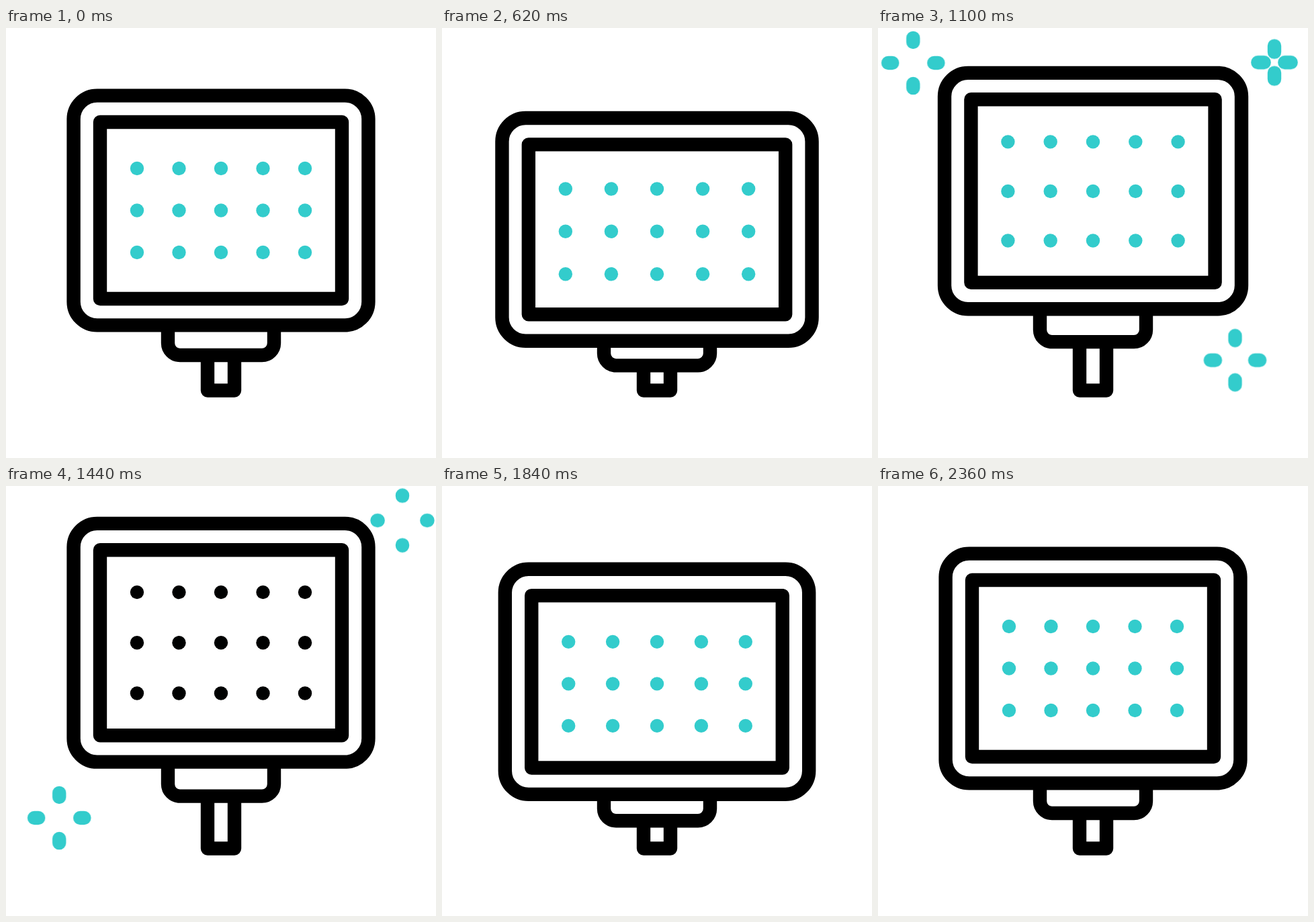
Recreate the animation shown at these times as an HTML page without scripts. Size 640 by 640 pixels, loop 2.56 s.

```html
<!DOCTYPE html>
<html lang="en">
<head>
<meta charset="utf-8">
<title>Bouncing light panel</title>
<style>
/* w: half width, t/b: panel top and bottom, n: neck bottom, c: middle dot row, g: row gap */
@property --w { syntax: "<length>"; inherits: true; initial-value: 219.4px; }
@property --t { syntax: "<length>"; inherits: true; initial-value: 100.6px; }
@property --b { syntax: "<length>"; inherits: true; initial-value: 442.4px; }
@property --n { syntax: "<length>"; inherits: true; initial-value: 487px; }
@property --c { syntax: "<length>"; inherits: true; initial-value: 271.5px; }
@property --g { syntax: "<length>"; inherits: true; initial-value: 62.5px; }
/* trimmed span of each spark arm */
@property --from { syntax: "<length>"; inherits: true; initial-value: 0px; }
@property --to { syntax: "<length>"; inherits: true; initial-value: 0px; }

:root {
  --teal: #33cccc;
  --loop: 2.56s;
  --smooth: cubic-bezier(.333, 0, .667, 1);
}
html, body { margin: 0; width: 100%; height: 100%; overflow: hidden; background: #fff; }
svg { display: block; width: 100%; height: 100%; }

.lamp { animation: bounce var(--loop) infinite; }
rect { fill: #fff; stroke: #000; stroke-width: 20.4px; stroke-linejoin: round; }
.stem { x: 300px; y: 400px; width: 40px; height: 139.5px; }
.neck { x: 241px; y: calc(var(--n) - 120px); width: 158px; height: 120px; rx: 18px; }
.case {
  x: calc(320px - var(--w)); y: var(--t);
  width: calc(2 * var(--w)); height: calc(var(--b) - var(--t));
  rx: 35px;
}
.screen {
  x: calc(359.4px - var(--w)); y: calc(var(--t) + 39.4px);
  width: calc(2 * var(--w) - 78.8px); height: calc(var(--b) - var(--t) - 78.8px);
}

circle {
  r: 10.2px;
  fill: var(--teal);
  cx: calc(320px + (var(--w) - 94.4px) * var(--i) / 2);
  cy: calc(var(--c) + var(--g) * var(--j));
  animation: blink-mid var(--loop) infinite;
}
circle:nth-child(1) { --i: -2; }
circle:nth-child(2) { --i: -1; }
circle:nth-child(3) { --i: 0; }
circle:nth-child(4) { --i: 1; }
circle:nth-child(5) { --i: 2; }
circle:first-child, circle:last-child { animation-name: blink-side; }

.spark {
  d: path("M0 -7.5V-37.5M0 7.5V37.5M-7.5 0H-37.5M7.5 0H37.5");
  fill: none;
  stroke: var(--teal);
  stroke-width: 20.4px;
  stroke-linecap: round;
  stroke-dasharray: calc(var(--to) - var(--from)) 99px;
  stroke-dashoffset: calc(-1 * var(--from));
  opacity: 0;
  animation: grow var(--loop) var(--at) infinite, trail var(--loop) var(--at) infinite,
    show var(--loop) var(--at) step-end infinite;
}

@keyframes bounce {
  0%, 7.8125%, 92.1875%, 100% {
    --w: 219.4px; --t: 100.6px; --b: 442.4px; --n: 487px; --c: 271.5px; --g: 62.5px;
    animation-timing-function: var(--smooth);
  }
  20.117% {
    --w: 231.4px; --t: 140px; --b: 470px; --n: 505.5px; --c: 308.2px; --g: 62.4px;
    animation-timing-function: cubic-bezier(.4, 0, .67, .59);
  }
  32.031% {
    --w: 226px; --t: 101px; --b: 442px; --n: 485px; --c: 273.2px; --g: 68.6px;
    animation-timing-function: cubic-bezier(.33, .43, .67, .77);
  }
  42.969% {
    --w: 221px; --t: 67px; --b: 418.3px; --n: 467.2px; --c: 243px; --g: 73.5px;
    animation-timing-function: cubic-bezier(.33, .66, .67, 1);
  }
  53.125%, 56.25% {
    --w: 219.4px; --t: 55.8px; --b: 410.6px; --n: 461.6px; --c: 233.2px; --g: 75.2px;
    animation-timing-function: var(--smooth);
  }
  68.75% {
    --w: 228px; --t: 129px; --b: 462.4px; --n: 500.5px; --c: 298.5px; --g: 62.5px;
    animation-timing-function: cubic-bezier(.33, 0, .67, .33);
  }
  71.875% {
    --w: 226.2px; --t: 123.8px; --b: 459px; --n: 498.3px; --c: 294.5px; --g: 62.5px;
    animation-timing-function: cubic-bezier(.33, .25, .67, 1);
  }
  81.25% {
    --w: 219.4px; --t: 84.6px; --b: 431px; --n: 478px; --c: 258px; --g: 66px;
    animation-timing-function: var(--smooth);
  }
}
@keyframes blink-mid {
  0%, 26.56%, 39.06%, 47.07%, 60.94%, 100% { fill: var(--teal); }
  31.25%, 34.37%, 51.76%, 56.25% { fill: #000; }
}
@keyframes blink-side {
  0%, 31.25%, 43.75%, 51.76%, 62.5%, 100% { fill: var(--teal); }
  35.94%, 39.06%, 56.5%, 57.8% { fill: #000; }
}
@keyframes grow {
  0% { --to: 0px; animation-timing-function: var(--smooth); }
  13.086%, 100% { --to: 30px; }
}
@keyframes trail {
  0% { --from: 0px; animation-timing-function: var(--smooth); }
  23.437%, 100% { --from: 30px; }
}
@keyframes show {
  0% { opacity: 1; }
  23.437%, 100% { opacity: 0; }
}
</style>
</head>
<body>
<svg viewBox="0 0 640 640">
  <g class="lamp">
    <rect class="stem"/>
    <rect class="neck"/>
    <rect class="case"/>
    <rect class="screen"/>
    <g style="--j:-1"><circle/><circle/><circle/><circle/><circle/></g>
    <g style="--j:0"><circle/><circle/><circle/><circle/><circle/></g>
    <g style="--j:1"><circle/><circle/><circle/><circle/><circle/></g>
  </g>
  <path class="spark" transform="translate(52.3 52)" style="--at:.812s"/>
  <path class="spark" transform="translate(531.5 494.5)" style="--at:.838s"/>
  <path class="spark" transform="translate(590 51.3)" style="--at:.99s"/>
  <path class="spark" transform="translate(79.2 494)" style="--at:1.152s"/>
</svg>
</body>
</html>
```
